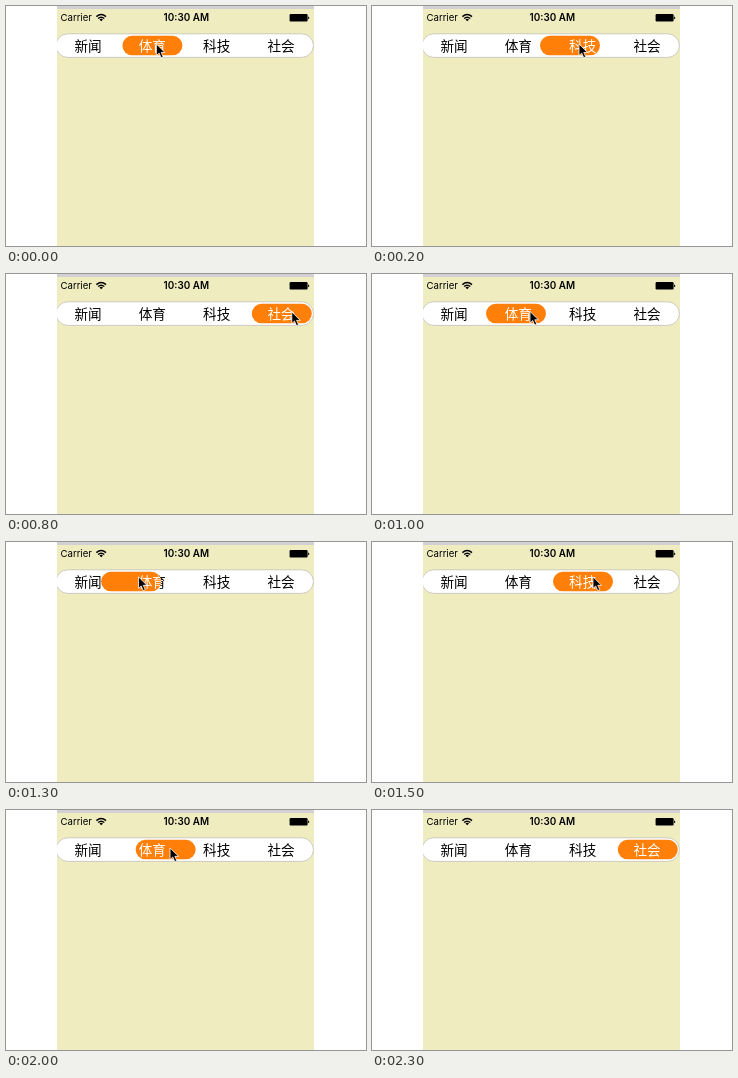
An HTML page that plays this animation: 360 by 240 pixels, repeating every 2.4 s.

```html
<!DOCTYPE html>
<html lang="zh-CN">
<head>
<meta charset="utf-8">
<title>Sliding segments</title>
<style>
  html, body { margin: 0; width: 100%; height: 100%; overflow: hidden; background: #fff; }
  svg { display: block; width: 360px; height: 240px; }
  .status { font: 9.6px Inter, "Open Sans", sans-serif; }
  .time { font-size: 9.9px; font-weight: 600; text-anchor: middle; }
  .tabs { font: 13.6px "Noto Sans CJK SC", "Noto Sans CJK", sans-serif; text-anchor: middle; }
</style>
</head>
<body>
<svg viewBox="0 0 360 240">
  <defs>
    <clipPath id="screen"><rect x="51" width="257" height="240"/></clipPath>
    <clipPath id="pillClip"><rect id="pill" y="29.8" width="60" height="19.5" rx="9.75"/></clipPath>
    <g id="labels" class="tabs"></g>
  </defs>
  <g clip-path="url(#screen)">
    <rect x="51" width="257" height="240" fill="#efecc0"/>
    <rect x="51" width="257" height="3" fill="#d3d0d3"/>

    <g class="status">
      <text x="54.5" y="15">Carrier</text>
      <text class="time" x="180.3" y="15">10:30 AM</text>
    </g>
    <g fill="none" stroke="#000" stroke-width="1.4">
      <path d="M90.4 10.6Q95.2 6.4 100 10.6M92.1 12.5Q95.2 9.8 98.3 12.5"/>
      <path d="M93.4 13.4Q95.2 12 97 13.4L95.2 15.2Z" fill="#000" stroke="none"/>
    </g>
    <rect x="283.6" y="8" width="18" height="7.5" rx="1.2"/>
    <path d="M302.1 10.4q1.2.3 1.2 1.4t-1.2 1.4z"/>

    <rect x="50" y="27.8" width="257.4" height="23.6" rx="11.8" fill="#fff" stroke="#b9b8b0" stroke-width=".7"/>
    <use href="#labels" fill="#000"/>
    <g clip-path="url(#pillClip)">
      <rect x="50" y="27" width="258" height="25" fill="#ff7f08"/>
      <use href="#labels" fill="#fff"/>
    </g>
  </g>
  <path id="cursor" d="M0 0V11.6L2.7 9.1L4.7 13.7L6.8 12.8L4.8 8.4H8.5Z" stroke="#fff" stroke-width=".8" stroke-linejoin="round"/>
</svg>
<script>
  const LOOP = 2400, STEP = 100, RELEASE = 2300;
  const MIN_X = 52.2, MAX_X = 245.8;

  // Turning points of the drag: time, pill's left edge, pointer's distance from it
  const drag = [
    [0, 116.4, 34], [200, 168, 39], [300, 240, 39], [500, MIN_X, 36],
    [800, MAX_X, 40], [1000, 114, 44], [1200, MIN_X, 36],
    [1500, 181, 40], [1800, MIN_X, 32], [RELEASE, MAX_X, 38], [LOOP, MAX_X, 38]
  ];

  const mix = (a, b, k) => a + (b - a) * k;

  function poseAt(t) {
    const next = drag.findIndex(key => key[0] > t);
    const from = drag[next - 1], to = drag[next];
    const k = (t - from[0]) / (to[0] - from[0]);
    return [mix(from[1], to[1], k), mix(from[2], to[2], k)];
  }

  const labels = document.getElementById("labels");
  ["新闻", "体育", "科技", "社会"].forEach((name, i) => {
    const text = document.createElementNS("http://www.w3.org/2000/svg", "text");
    text.setAttribute("x", 82 + i * 64.35);
    text.setAttribute("y", 44.7);
    text.textContent = name;
    labels.append(text);
  });

  const pill = document.getElementById("pill");
  const cursor = document.getElementById("cursor");
  const start = performance.now();

  function draw(now) {
    const elapsed = Math.max(0, now - start) % LOOP;
    const t = Math.floor(elapsed / STEP) * STEP;
    const [x, grip] = poseAt(t);
    const tipY = 38 - 3.5 * Math.exp(-(((t - 1400) / 300) ** 2));
    pill.setAttribute("x", x);
    cursor.setAttribute("transform", `translate(${x + grip} ${tipY})`);
    cursor.setAttribute("visibility", t < RELEASE ? "visible" : "hidden");
    requestAnimationFrame(draw);
  }
  draw(start);
</script>
</body>
</html>
```
